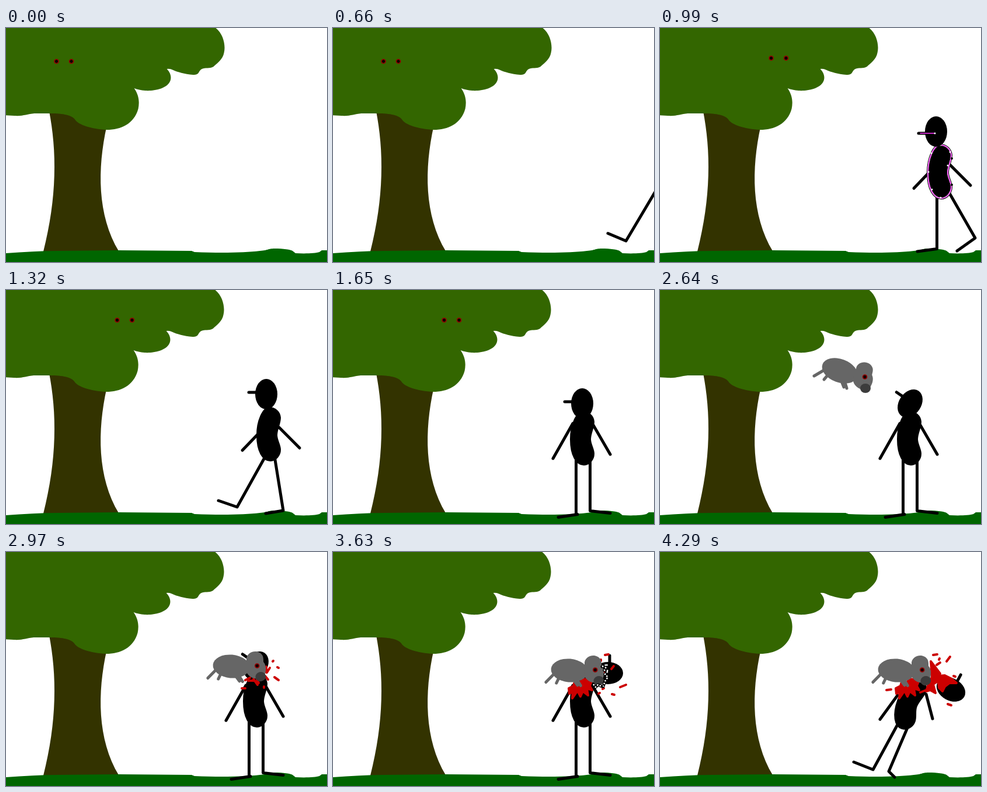
Write an HTML page with a canvas that moves like this. It is 550 px wide and 400 px high and loops after 4620 ms.

```html
<!DOCTYPE html>
<html lang="en">
<head>
<meta charset="utf-8">
<title>Under the tree</title>
<style>
  html, body { margin: 0; width: 100%; height: 100%; overflow: hidden; background: #fff; }
  canvas { display: block; }
</style>
</head>
<body>
<canvas id="stage" width="550" height="400"></canvas>
<script>
const ctx = document.getElementById('stage').getContext('2d');
const LOOP = 4620, STEP = 330;
const GREY = '#666', RED = '#c00';

const CANOPY = 'M-5 -2H356C372 8 376 30 373 42C371 54 361 60 355 66C348 70 341 67 335 70' +
  'C328 74 332 80 320 80C305 79 293 75 286 72Q280 69 275 70C283 78 283 87 280 92' +
  'C274 104 252 108 238 107Q227 106 219 103C228 116 228 128 226 138C219 164 196 174 172 174' +
  'C146 173 123 165 118 157C113 149 98 146 75 146H48C36 147 28 151 14 150L-5 149Z';
const TRUNK = 'M73.5 140C87.5 210 87.5 290 64 382H193.5C156 320 156.5 240 172.5 168V140Z';
const GROUND = 'M0 385C30 383 60 381 90 381L193 380 318 381 323 383C370 385 410 384 435 381' +
  'C449 380 449 377 460 377C475 377 488 379 491 381L496 385C515 386 530 385 537 383L541 380H550V400H0Z';
const TORSO = 'M0 -45C-11 -45 -21 -22 -21 2C-21 30 -11 46 2 46C12 46 19 36 19 27' +
  'C19 18 13 11 13 2C13 -8 19 -17 19 -28C18 -38 10 -45 0 -45Z';
const MUZZLE = 'M28 -4C30 -17 52 -19 56.5 -4C57.5 2 54.5 6 55.5 8C58.5 14 56 24 50 31L38 32C30 30 21 22 23 12Z';

const STANDING = 'M411 228L377 288M446 231L475 281M416.5 285V384M419 383.5L386 388.5M440.5 285V377.5L475 381.5';
const WOUND = 'M404 233L412 229 414 222 420 226 428 217 436 218 443 221 440 229 444 236 435 233 ' +
  '437 245 428 238 424 247 419 237 410 250 411 239 405 242Z';
const SPLASH = 'M410 219l8-4M415 220h9M424 217l7 10M430 218l3 6M446 196v10M447 206l5-8M444 212l5 6' +
  'M457 187l1-1M465 197l2 1M460 214l7 5M404 233h6M442 230v2';
const SPRAY = 'M466 176l6-1M477 200l4-5M455 242l2-1M478 243l4 1M492 231l10-4M459 184v2M466 206l2 4M462 234l2-1';
const GUSH = 'M464 187L474 200 480 208 472 212 474 222 468 226 472 241 463 236 456 238 460 226 466 214Z' +
  'M476 212L488 211 500 217 508 224 496 224 488 230 484 238 478 232Z' +
  'M388 236l8-1M446 240l10-4M474 193l6-4M468 176l7-1M491 187l6-8M478 184l1-2M503 212l3 1M493 260l6 2';
const BITE = 'M461 196L470 192 465 202 472 203 466 209 471 214 466 221 463 230M446 226L450 231 454 227 461 230';

// One entry per held pose; head, torso and beast are [x, y, degrees].
const stand = { limbs: STANDING, torso: [428, 253, 0] };
const poses = [
  { eyes: [86.5, 57] },
  { eyes: [86.5, 57], limbs: 'M555 275L502 364 471 351' },
  { eyes: [190.5, 51.5], head: [473, 177, 0], torso: [480, 245, 0], selected: true,
    limbs: 'M460 248L435 274M497 234L532 269M474.5 285V377.5L441 382M494 279L540 359 509 381' },
  { eyes: [190.5, 51.5], head: [446, 178, 0], torso: [451, 246, 0],
    limbs: 'M433 245L405 274M468 235L503 270M444 285L396 371 364 360M460 284L475 377 445 382' },
  { ...stand, eyes: [190.5, 51.5], head: [427, 194, 0] },
  { ...stand, head: [427, 194, 0], beast: [250, 97, 0] },
  { ...stand, head: [427.5, 194, 20], beast: [279, 115, 0] },
  { ...stand, head: [428.5, 194, 34], beast: [308, 138, 0] },
  { ...stand, head: [428.5, 194, 34], beast: [386, 195.5, -15], blood: SPLASH },
  { ...stand, head: [452, 199, 64], beast: [393, 198.5, -15], blood: WOUND + SPLASH },
  { ...stand, head: [471, 207, 90], beast: [405, 202.5, -15], blood: WOUND + SPRAY, bite: true },
  { head: [487, 222, 104], torso: [428, 255, 10], beast: [405, 202.5, -15], blood: WOUND + GUSH,
    limbs: 'M409 236L377 287M451 237L471 283M411 290L390 378 360 372M432 290L417 376 440 385' },
  { head: [498.5, 235, 118], torso: [428, 258, 20], beast: [405, 202.5, -15], blood: WOUND + GUSH,
    limbs: 'M407 245L377 286M456 243L467 285M407 295L365 372 332 359M425 298L392 375 402 385' },
];

function fill(path, color) {
  ctx.fillStyle = color;
  ctx.fill(new Path2D(path));
}

function stroke(path, color, width, dash = []) {
  ctx.strokeStyle = color;
  ctx.lineWidth = width;
  ctx.setLineDash(dash);
  ctx.stroke(new Path2D(path));
}

function oval(x, y, rx, ry, color, degrees = 0) {
  ctx.fillStyle = color;
  ctx.beginPath();
  ctx.ellipse(x, y, rx, ry, degrees * Math.PI / 180, 0, 2 * Math.PI);
  ctx.fill();
}

function placed([x, y, degrees], draw) {
  ctx.save();
  ctx.translate(x, y);
  ctx.rotate(degrees * Math.PI / 180);
  draw();
  ctx.restore();
}

function eye(x, y) {
  oval(x, y, 4.3, 4.3, '#900');
  oval(x, y, 2.7, 2.7, '#100');
}

function head(selected) {
  oval(0, 0, 19, 26, '#000');
  if (!selected) return stroke('M-30 -3H-16', '#000', 5);
  stroke('M-30 3H-3', '#000', 5);
  stroke('M-27 3H-3', '#f3f', 1.5);
  oval(-2, 3, 1.5, 1.5, '#fff');
}

function torso(selected) {
  fill(TORSO, '#000');
  stroke(TORSO, '#000', selected ? 4 : 2);
  if (!selected) return;
  stroke(TORSO, '#fff', 2);
  stroke(TORSO, '#f3f', 1.5);
  for (const [x, y] of [[-15, -31], [1, -45], [17, -33], [-20, 1], [-14, 31], [1, 45], [13, -10]])
    oval(x, y, 1.5, 1.5, '#fff');
  oval(20, -22, 2, 2, '#000');
  oval(20, 23, 2, 2, '#000');
}

function beast() {
  stroke('M-27 -1L-44 9M-21 8L-27 15M3 18L7 28M9 20L12 30', GREY, 5);
  oval(0, 0, 31.5, 20, GREY, 20);
  fill(MUZZLE, GREY);
  eye(43, 10.5);
  oval(44, 30, 9, 8, '#3c3c3c');
}

function blood(path) {
  fill(path, RED);
  stroke(path, RED, 4);
}

function bite() {
  stroke(BITE, '#000', 5);
  ctx.lineCap = 'butt';
  stroke(BITE, '#fff', 2.5, [2.5, 2.5]);
}

function render(time) {
  const t = time % LOOP;
  const index = Math.max(0, Math.floor(t / STEP) - 1);
  const pose = poses[index];

  ctx.fillStyle = '#fff';
  ctx.fillRect(0, 0, 550, 400);
  ctx.lineCap = ctx.lineJoin = 'round';
  fill(TRUNK, '#330');
  placed([index < 2 ? 0.6 : -0.4, 0, 0], () => fill(CANOPY, '#360'));
  fill(GROUND, '#060');

  if (pose.eyes) {
    const [x, y] = pose.eyes;
    eye(x, y);
    eye(x + 25.5, y);
  }
  if (pose.limbs) stroke(pose.limbs, '#000', 5);
  if (pose.torso) placed(pose.torso, () => torso(pose.selected));
  if (pose.head) placed(pose.head, () => head(pose.selected));
  if (pose.blood) blood(pose.blood);
  if (pose.beast) placed(pose.beast, beast);
  if (pose.bite) bite();
}

const start = performance.now();
function tick() {
  render(performance.now() - start);
  requestAnimationFrame(tick);
}
tick();
</script>
</body>
</html>
```
